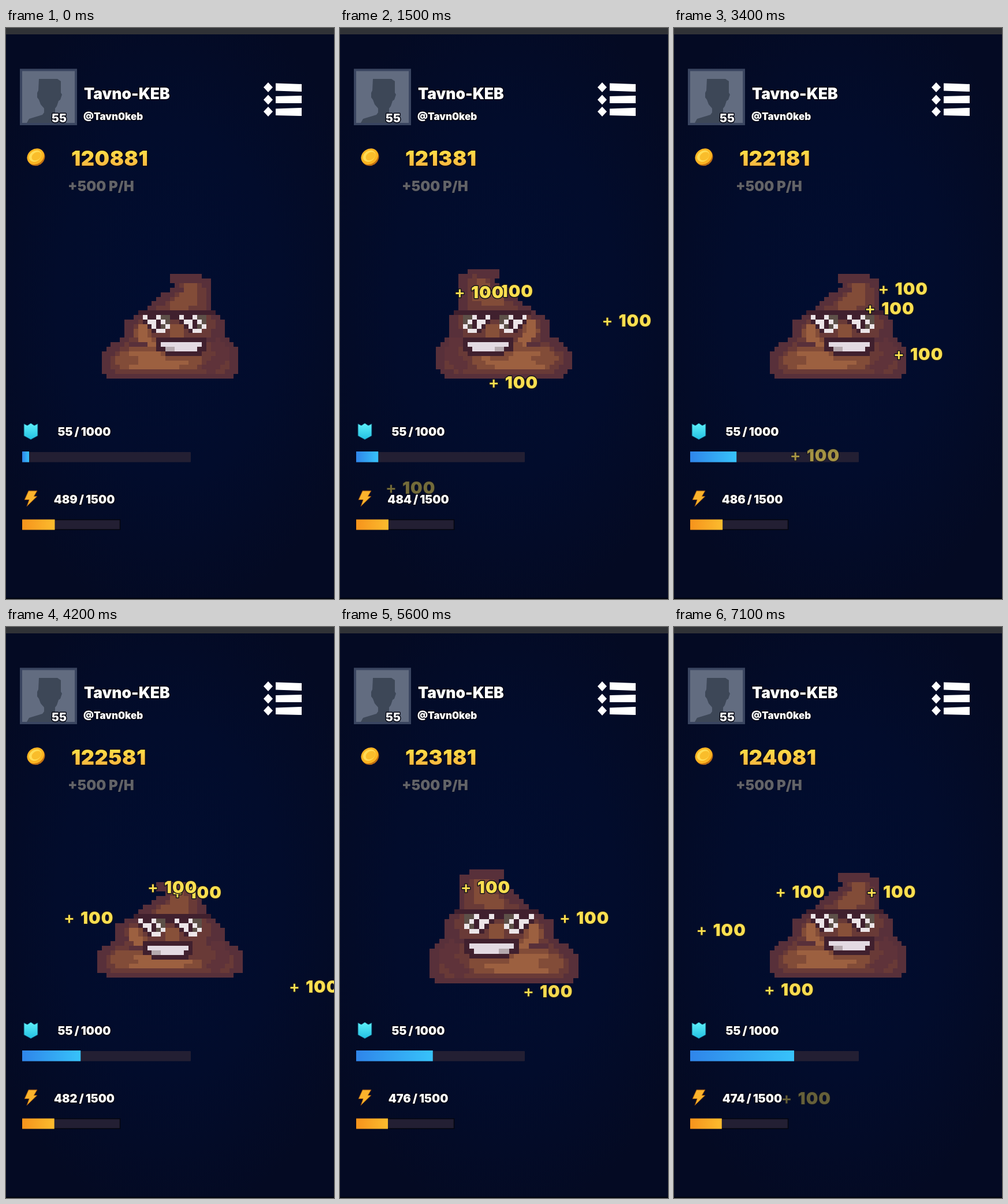
Recreate the animation shown at these times as an HTML page with a canvas. Size 568x987 px, loop 7200 ms.

```html
<!DOCTYPE html>
<html lang="en">
<head>
<meta charset="utf-8">
<title>Tap game</title>
<style>
html, body { margin: 0; width: 100%; height: 100%; overflow: hidden; }
body { position: relative; background: radial-gradient(ellipse 62% 56% at 50% 48%, #010d30 0%, #020c2c 55%, #040a23 100%); }
#blob { position: absolute; left: 141.8px; top: 386.2px; width: 284.4px; height: 219.8px;
  image-rendering: pixelated; transform-origin: 50% 109px; }
svg { position: absolute; left: 0; top: 0; width: 568px; height: 987px; overflow: hidden; }
text { font-family: Inter, "Open Sans", sans-serif; font-weight: 900; fill: #fff;
  paint-order: stroke; stroke: #060814; stroke-width: 3px; stroke-linejoin: round; white-space: pre; }
.label { font-size: 20px; word-spacing: -1px; text-anchor: middle; }
.pop text { font-size: 29px; fill: #fbdf50; stroke: #17171c; letter-spacing: 1px; }
.pop .plus { font-size: 28px; font-weight: 600; }
</style>
</head>
<body>
<canvas id="blob" width="36" height="28"></canvas>
<svg viewBox="0 0 568 987">
  <defs>
    <linearGradient id="gold" x2="0" y2="1"><stop offset=".2" stop-color="#ffdf48"/><stop offset=".9" stop-color="#f6b03e"/></linearGradient>
    <linearGradient id="blue"><stop stop-color="#2f85ea"/><stop offset="1" stop-color="#37c3fa"/></linearGradient>
    <linearGradient id="orange"><stop stop-color="#f6931c"/><stop offset="1" stop-color="#fcbc2e"/></linearGradient>
    <linearGradient id="cyan" x2="0" y2="1"><stop stop-color="#5ff1fa"/><stop offset="1" stop-color="#22bfe2"/></linearGradient>
  </defs>
  <rect width="568" height="11" fill="#303236"/>
  <rect y="985" width="568" height="2" fill="#01040f"/>

  <rect x="26" y="72.5" width="95" height="93.5" fill="#626c80" stroke="#3a4560" stroke-width="4"/>
  <path d="M57 88H89L95 92V112L97 115 94 124 91 126 88 135 85 139V147L104 157V164H36L40 157 63 150 66 146V139L60 132 57 124 54 120V112L56 108Z" fill="#3d4757"/>
  <text x="79" y="163" font-size="20">55</text>
  <text x="135" y="123" font-size="26.5">Tavno-KEB</text>
  <text x="134" y="159" font-size="17">@Tavn0keb</text>

  <g fill="#fff">
    <path d="M454 94l8 8.500-8 8.500-8-8.500zM454 115.500l8 8.500-8 8.500-8-8.500zM454 136l8 8.500-8 8.500-8-8.500z"/>
    <path d="M467 95.500L512 97V110L467 108.500ZM467 118L512 117V130H467ZM467 139.500L512 138V152L467 151Z"/>
  </g>

  <g transform="rotate(-35 51.500 222.500)">
    <ellipse cx="51.500" cy="224" rx="15.500" ry="14" fill="#c06f12"/>
    <ellipse cx="51.500" cy="222" rx="15.500" ry="13" fill="#fbb522"/>
    <ellipse cx="51.500" cy="221" rx="11.500" ry="9" fill="#ffdc55"/>
    <ellipse cx="53" cy="222.500" rx="9" ry="6.500" fill="#f9bd2b"/>
  </g>
  <text id="coins" x="113" y="238" font-size="36" letter-spacing=".5" style="fill:url(#gold);stroke:#0a0a12"/>
  <text x="107" y="282" font-size="24" style="fill:#626368;stroke:#050818;stroke-width:1px">+500 P/H</text>

  <path d="M31 684L37 687 43 683 49 687 55 684V705L43 711.500 31 705Z" fill="url(#cyan)" stroke="#0c3e5c"/>
  <rect x="28" y="733" width="292" height="17.500" rx="1" fill="#231f33"/>
  <rect id="level" x="28" y="732" height="18.500" fill="url(#blue)"/>
  <path d="M39 800H54L48.500 809.500H54L36 827 40 815.500H32Z" fill="#fbb32c" stroke="#8d4a0c"/>
  <rect x="28" y="850" width="169.500" height="17" fill="#231f33" stroke="#05060f" stroke-width="1.500"/>
  <rect id="fuel" x="28" y="849.500" height="18" fill="url(#orange)"/>

  <g class="pop" id="pops"></g>
  <text class="label" x="135.500" y="705">55 / 1000</text>
  <text class="label" id="energy" x="135.500" y="822"/>
</svg>
<script>
const LOOP = 7200, STEP = 100, SWAY = 850;
const $ = id => document.getElementById(id);
const ctx = $('blob').getContext('2d');

// Each tap: time in ms, start x, sideways speed in px/s
const taps = [
  [713, 260, -230], [912, 245, 20], [1093, 250, 500], [1273, 244, 20], [1440, 216, -300],
  [1695, 249, -260], [1880, 240, -620], [2057, 254, -60], [2125, 250, 0],
  [2667, 252, -70], [2884, 251, 250], [3047, 249, 230], [3284, 284, 600],
  [3600, 250, 400], [3800, 240, -350], [3950, 250, 150], [4050, 260, -100],
  [4450, 247, 230], [4630, 247, -400], [4850, 211, -600], [4990, 256, 100],
  [5200, 260, 300], [5455, 248, -270], [5634, 248, 480], [5815, 251, -350], [6000, 251, 0], [6187, 291, 300],
  [6295, 250, -80], [6494, 250, -155], [6655, 252, -480], [6853, 249, 340], [7047, 207, -600]
];
const pops = taps.map(() => {
  const el = document.createElementNS('http://www.w3.org/2000/svg', 'text');
  el.innerHTML = '<tspan class="plus">+</tspan><tspan x="29">100</tspan>';
  return $('pops').appendChild(el);
});

// Body shapes in cells: x, height above the ground
const shapes = [
  ['#58303a', '18,23 24,23 27,21.5 27,16 30,12 30,9 33,6.5 33,2 31,0 5,0 3,2 3,5.5 5,7.7 8,9 8,12.5 12,15 18,19.7 20,21 18,21'],
  ['#693a37', '20,21 24,21.5 25.5,20 25.5,15 28,12 26,8 31,6 31,2 28,1 7,1 5,3 5,5 8,7.5 10,9 10,12 14,14.5 18,17.5 21,19.5'],
  ['#5f333a', '27,8 29,9 31,6 30,3 27,1 25,3 28,5'],
  ['#824c38', '21.5,21 23.5,20.5 24,16 20,15 17,16 20,18.5'],
  ['#824c38', '11,12 13,13 14,9 16,7 16,6 20,5 25,4.5 24,2 8,2 6,4 7,6 12,7 10,10'],
  ['#9c6040', '11,12 12.5,12 13,9.5 15,7.5 13,7 10.5,9'],
  ['#9c6040', '9,5.8 15,6 17,4 23,4.5 22,3 18,2 9,2.4 12,4'],
  ['#58303a', '7,8.2 13,8 13,7.2 11,6.9']
].map(([color, pts]) => [color, pts.split(' ').map(p => p.split(',').map(Number))]);

// Width, height, lean, then shifts of glasses and mouth
const poses = {
  rest: [1, 1, 0, 0, 0, 0, 0],
  rise: [1, 1.05, 1, 1, 0, 1, 0],
  tall: [.9, 1.13, 3.4, 3, 4, 1, 2],
  flat: [1.067, .91, -3, -1, -1, -3, -1]
};
// End of each pose within one sway; the last entry mirrors it
const sway = [
  [80, 'rest'], [160, 'rise'], [280, 'tall'], [320, 'rest'], [425, 'flat'],
  [505, 'rest', 1], [590, 'tall', 1], [690, 'rise', 1], [SWAY, 'flat']
];

function drawBlob(name, flip) {
  const [sx, sy, lean, gx, gy, mx, my] = poses[name];
  ctx.setTransform(1, 0, 0, 1, 0, 0);
  ctx.clearRect(0, 0, 36, 28);
  if (flip) ctx.setTransform(-1, 0, 0, 1, 36, 0);
  const box = (color, x, v, w, h = 1) => {
    ctx.fillStyle = color;
    ctx.fillRect(x, 28 - v - h, w, h);
  };

  for (const [color, pts] of shapes) {
    const path = new Path2D();
    for (const [x, v] of pts)
      path.lineTo(18 + (x - 18) * sx + lean * (v / 23) ** 1.4, 28 - v * sy);
    path.closePath();
    ctx.save();
    ctx.resetTransform();
    const cells = [];
    for (let y = 0; y < 28; y++)
      for (let x = 0; x < 36; x++)
        if (ctx.isPointInPath(path, x + .5, y + .5)) cells.push([x, y]);
    ctx.restore();
    for (const [x, y] of cells) box(color, x, 27 - y, 1);
  }

  const dark = '#40202e', white = '#ece5e8';
  box('#875039', 18 + gx, 9 + gy, 3, 3);
  box(dark, 11 + gx, 14 + gy, 17);
  for (const left of [12, 20])
    for (let r = 0; r < 4; r++)
      for (let c = r ? r - 1 : 0; c < (r > 2 ? 5 : 6); c++) {
        const d = c - r;
        const lit = d === 0 || d === 3 || (r % 2 && d === 1);
        box(lit ? white : c > 3 ? '#5d5048' : dark, left + gx + c, 13 + gy - r, 1);
      }
  box(dark, 18 + gx, 13 + gy, 2);

  box(dark, 15 + mx, 6 + my, 11, 3);
  box(dark, 17 + mx, 5 + my, 8);
  box('#e3dae2', 16 + mx, 7 + my, 9);
  box('#e3dae2', 17 + mx, 6 + my, 7);
  box('#b5a9ae', 17 + mx, 6 + my, 2);
}

function render(t) {
  const count = taps.filter(tap => tap[0] <= t).length;
  const energy = 489 - count + (t >= 2000 ? 10 : 0) + (t >= 6800 ? 7 : 0);
  $('coins').textContent = 120881 + count * 100;
  $('energy').textContent = energy + ' / 1500';
  $('level').setAttribute('width', 12 + count * 5.25);
  $('fuel').setAttribute('width', energy * .1155);

  taps.forEach(([start, x, vx], i) => {
    const age = (t - start) / 1000, el = pops[i];
    const alpha = age < 0 ? 0 : Math.min(1, 1 - (age - .6) / .34);
    el.style.display = alpha > 0 ? '' : 'none';
    el.style.opacity = alpha;
    el.setAttribute('transform', `translate(${x + vx * age} ${460 + 850 * (age - .15) ** 2})`);
  });

  // The blob swells while it is held down before a tap
  const next = taps[count], last = count ? taps[count - 1][0] : 0;
  const held = next && t > next[0] - (next[0] - last) * .32;
  $('blob').style.transform = held ? 'scale(1.09)' : '';
  const [, name, flip] = sway.find(s => t % SWAY < s[0]);
  drawBlob(name, flip);
}

let shown = -1;
function tick(now) {
  const t = Math.floor(now % LOOP / STEP) * STEP;
  if (t !== shown) render(shown = t);
  requestAnimationFrame(tick);
}
tick(performance.now());
</script>
</body>
</html>
```
